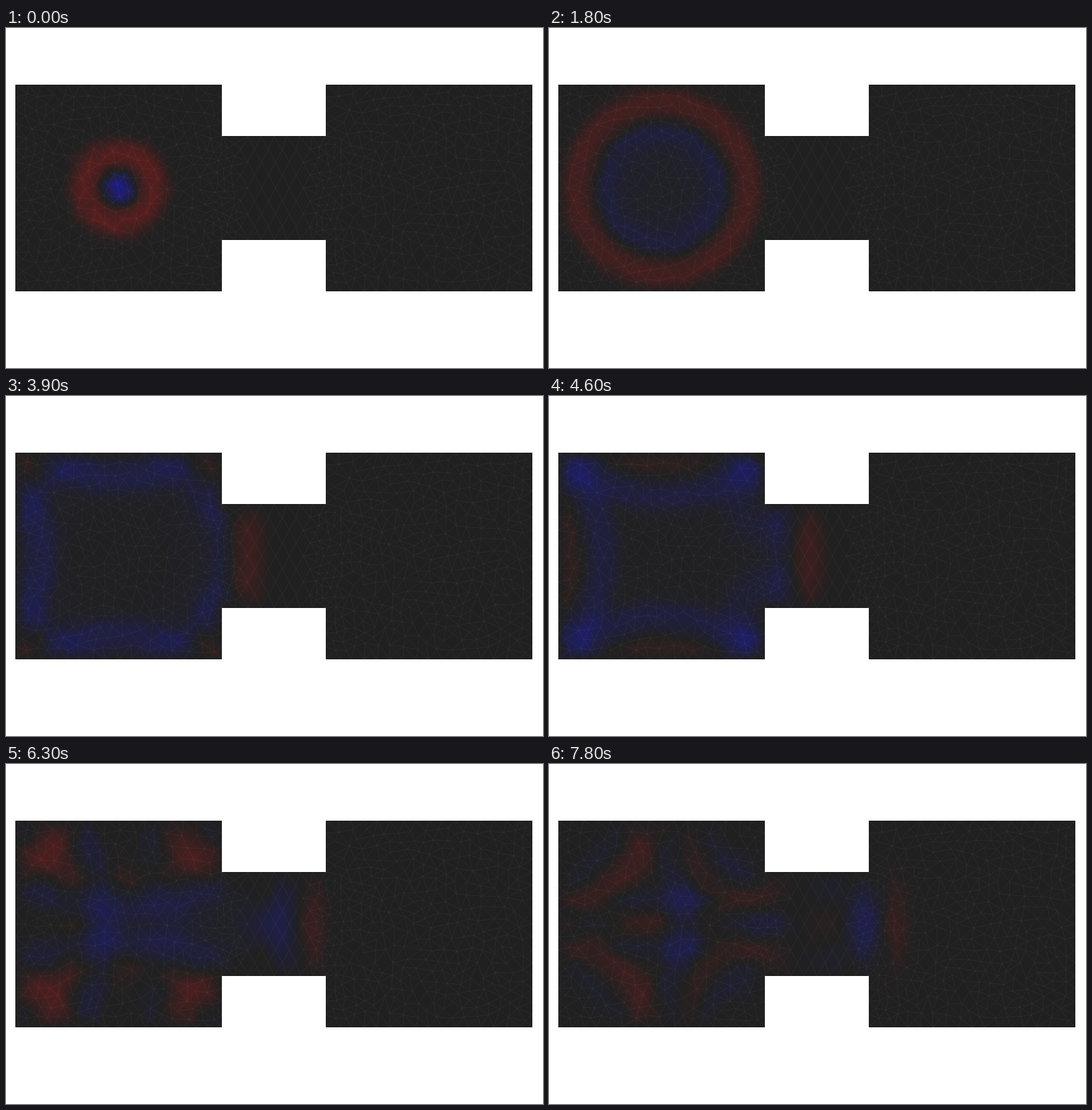
An HTML page with a canvas that plays this animation: 806 by 510 pixels, repeating every 8 s.

```html
<!DOCTYPE html>
<html lang="en">
<head>
<meta charset="utf-8">
<title>Wave in a dumbbell domain</title>
<style>
  html, body { margin: 0; width: 100%; height: 100%; overflow: hidden; background: #fff; }
  canvas { display: block; }
</style>
</head>
<body>
<canvas id="stage" width="806" height="510"></canvas>
<script>
const W = 806, H = 510, LOOP = 8000;
const UNIT = 155.2, LEFT = 14, TOP = 84.8;          // two 2x2 rooms joined by a 1x1 channel
const X1 = LEFT + 2 * UNIT, X2 = LEFT + 3 * UNIT, RIGHT = LEFT + 5 * UNIT;
const MID = TOP + UNIT, BOTTOM = TOP + 2 * UNIT;
const C1 = MID - UNIT / 2, C2 = MID + UNIT / 2;
const BASE = 32, GAIN = 215;

// Runs of picture changes: [first time, count], 200 ms apart within a run.
const RUNS = [[0, 1], [100, 6], [1400, 6], [2900, 1], [3200, 3], [3900, 3],
              [4600, 6], [5800, 2], [6300, 6], [7600, 2]];
const times = RUNS.flatMap(([t, n]) => Array.from({ length: n }, (_, i) => t + 200 * i));

let seed = 11;
function random() {
  seed = (seed * 1664525 + 1013904223) >>> 0;
  return seed / 4294967296;
}

const inside = (x, y, m = 0) =>
  (y > C1 + m && y < C2 - m && x > LEFT + m && x < RIGHT - m) ||
  (y > TOP + m && y < BOTTOM - m &&
    ((x > LEFT + m && x < X1 - m) || (x > X2 + m && x < RIGHT - m)));

// ---- mesh ----
function makePoints() {
  const pts = [];
  const outline = [[LEFT, TOP], [X1, TOP], [X1, C1], [X2, C1], [X2, TOP], [RIGHT, TOP],
                   [RIGHT, BOTTOM], [X2, BOTTOM], [X2, C2], [X1, C2], [X1, BOTTOM], [LEFT, BOTTOM]];
  outline.forEach(([x, y], i) => {
    const [p, q] = outline[(i + 1) % outline.length];
    const n = Math.round(Math.hypot(p - x, q - y) / 19.4);
    for (let k = 0; k < n; k++) pts.push([x + (p - x) * k / n, y + (q - y) * k / n]);
  });
  // Regular lattice in the channel, scattered points elsewhere.
  const rows = 8, side = 20.8;
  for (let r = 1; r < rows; r++) {
    for (let x = X1 + 28 + (r % 2 ? 0 : side / 2); x < X2 - 18; x += side) {
      pts.push([x, C1 + r * UNIT / rows]);
    }
  }
  for (let i = 0; i < 24000; i++) {
    const x = LEFT + random() * 5 * UNIT, y = TOP + random() * 2 * UNIT;
    if (!inside(x, y, 8) || (x > X1 + 22 && x < X2 - 16)) continue;
    const nearMouth = (Math.abs(x - X1) < 28 || Math.abs(x - X2) < 28) && y > C1 && y < C2;
    const gap = nearMouth ? 10 : 13.5;
    if (pts.every(p => (p[0] - x) ** 2 + (p[1] - y) ** 2 > gap * gap)) pts.push([x, y]);
  }
  return pts;
}

// Incremental Delaunay triangulation.
function triangulate(points) {
  const n = points.length;
  const pts = points.map(([x, y]) => [x + (random() - 0.5) * 1e-3, y + (random() - 0.5) * 1e-3]);
  pts.push([-9000, -8000], [10000, -8000], [400, 14000]);
  const tri = (a, b, c) => {
    const [ax, ay] = pts[a];
    const bx = pts[b][0] - ax, by = pts[b][1] - ay, cx = pts[c][0] - ax, cy = pts[c][1] - ay;
    const d = 2 * (bx * cy - by * cx), b2 = bx * bx + by * by, c2 = cx * cx + cy * cy;
    const ux = (cy * b2 - by * c2) / d, uy = (bx * c2 - cx * b2) / d;
    return { v: [a, b, c], x: ax + ux, y: ay + uy, r2: ux * ux + uy * uy };
  };
  let tris = [tri(n, n + 1, n + 2)];
  for (let i = 0; i < n; i++) {
    const [x, y] = pts[i], rim = new Map(), keep = [];
    for (const t of tris) {
      if ((t.x - x) ** 2 + (t.y - y) ** 2 >= t.r2) { keep.push(t); continue; }
      t.v.forEach((a, k) => {
        const b = t.v[(k + 1) % 3], key = Math.min(a, b) * 10000 + Math.max(a, b);
        if (!rim.delete(key)) rim.set(key, [a, b]);
      });
    }
    for (const [a, b] of rim.values()) keep.push(tri(a, b, i));
    tris = keep;
  }
  return tris.map(t => t.v).filter(v => {
    if (v.some(k => k >= n)) return false;
    const mean = j => (points[v[0]][j] + points[v[1]][j] + points[v[2]][j]) / 3;
    return inside(mean(0), mean(1));
  });
}

// ---- wave equation with fixed walls, released from a flat-topped bump ----
function solve(points, frames) {
  const N = 60, nx = 5 * N + 1, ny = 2 * N + 1, h = UNIT / N;
  const sub = 5, warmUp = 24, lambda = (8.4 / sub / h) ** 2, radius = 30 / h;
  let now = new Float64Array(nx * ny), old, next = new Float64Array(nx * ny);
  const cells = [];
  for (let j = 1; j < ny - 1; j++) {
    for (let i = 1; i < nx - 1; i++) {
      const room = i < 2 * N || i > 3 * N, hall = j > N / 2 && j < N * 1.5;
      if (!room && !hall) continue;
      const k = j * nx + i;
      cells.push(k);
      now[k] = Math.exp(-((Math.hypot(i - N, j - N) / radius) ** 4));
    }
  }
  old = now.slice();
  const advance = () => {
    for (const k of cells) {
      next[k] = 2 * now[k] - old[k] +
        lambda * (now[k - 1] + now[k + 1] + now[k - nx] + now[k + nx] - 4 * now[k]);
    }
    [old, now, next] = [now, next, old];
  };
  const sample = ([x, y]) => {
    const gx = (x - LEFT) / h, gy = (y - TOP) / h;
    const i = Math.min(nx - 2, Math.max(0, Math.floor(gx)));
    const j = Math.min(ny - 2, Math.max(0, Math.floor(gy)));
    const fx = gx - i, fy = gy - j, k = j * nx + i;
    return (now[k] * (1 - fx) + now[k + 1] * fx) * (1 - fy) +
           (now[k + nx] * (1 - fx) + now[k + nx + 1] * fx) * fy;
  };
  for (let s = 0; s < warmUp; s++) advance();
  const out = [];
  for (let f = 0; f < frames; f++) {
    out.push(points.map(sample));
    for (let s = 0; s < sub; s++) advance();
  }
  return out;
}

// ---- drawing ----
const ctx = document.getElementById("stage").getContext("2d");
const points = makePoints(), tris = triangulate(points), fields = solve(points, times.length);
const image = ctx.createImageData(W, H), px = image.data;

function paint(k, u) {
  const v = Math.min(0.6, Math.abs(u)), low = BASE - 8 * v, high = BASE + GAIN * v;
  px[k] = u > 0 ? high : low;
  px[k + 1] = low;
  px[k + 2] = u > 0 ? low : high;
  px[k + 3] = 255;
}

function shade(v, field) {
  const [a, b, c] = v.map(i => points[i]), [ua, ub, uc] = v.map(i => field[i]);
  const det = (b[1] - c[1]) * (a[0] - c[0]) + (c[0] - b[0]) * (a[1] - c[1]);
  if (Math.abs(det) < 1e-6) return;
  const xs = [a[0], b[0], c[0]], ys = [a[1], b[1], c[1]];
  const xEnd = Math.max(...xs), yEnd = Math.max(...ys);
  for (let y = Math.floor(Math.min(...ys)); y < yEnd; y++) {
    for (let x = Math.floor(Math.min(...xs)); x < xEnd; x++) {
      const dx = x + 0.5 - c[0], dy = y + 0.5 - c[1];
      const p = ((b[1] - c[1]) * dx + (c[0] - b[0]) * dy) / det;
      const q = ((c[1] - a[1]) * dx + (a[0] - c[0]) * dy) / det;
      if (p < -1e-6 || q < -1e-6 || p + q > 1 + 1e-6) continue;
      paint((y * W + x) * 4, ua * p + ub * q + uc * (1 - p - q));
    }
  }
}

// Faint seams between triangles; axis-aligned edges leave none.
function makeSeams() {
  const path = new Path2D(), seen = new Set();
  for (const v of tris) {
    v.forEach((a, k) => {
      const b = v[(k + 1) % 3], key = Math.min(a, b) * 10000 + Math.max(a, b);
      const [x0, y0] = points[a], [x1, y1] = points[b];
      if (seen.has(key) || Math.abs(x0 - x1) < 0.5 || Math.abs(y0 - y1) < 0.5) return;
      seen.add(key);
      path.moveTo(x0, y0);
      path.lineTo(x1, y1);
    });
  }
  return path;
}
const seams = makeSeams();

function draw(n) {
  for (let y = 0; y < H; y++) {
    for (let x = 0; x < W; x++) {
      if (inside(x + 0.5, y + 0.5)) paint((y * W + x) * 4, 0);
    }
  }
  for (const v of tris) shade(v, fields[n]);
  ctx.putImageData(image, 0, 0);
  ctx.strokeStyle = "rgba(255,255,255,0.055)";
  ctx.lineWidth = 0.8;
  ctx.stroke(seams);
}

let shown = -1;
function tick() {
  const t = performance.now() % LOOP;
  let n = times.length - 1;
  while (times[n] > t) n--;
  if (n !== shown) draw(shown = n);
  requestAnimationFrame(tick);
}
tick();
</script>
</body>
</html>
```
